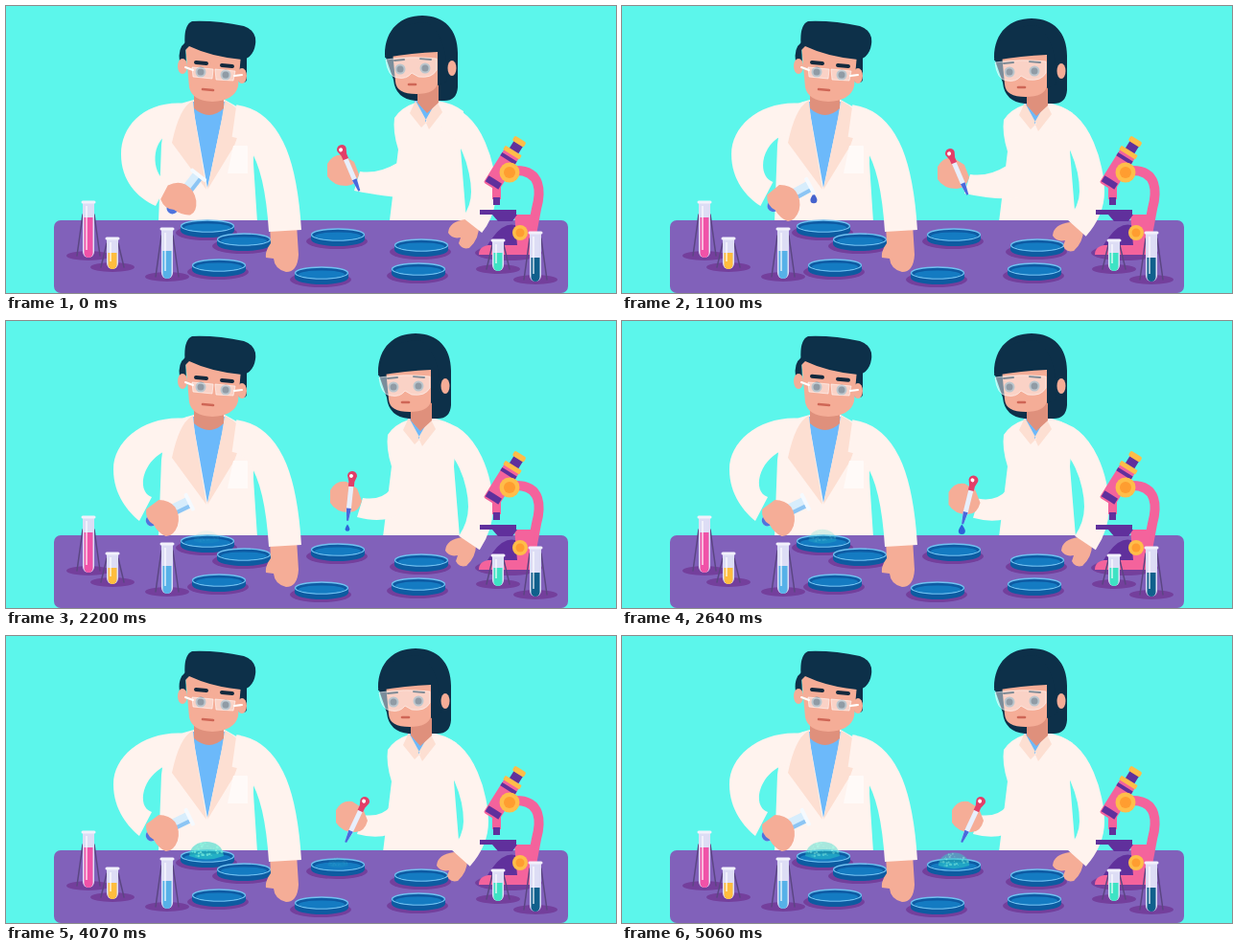
Animation, 636 px wide and 300 px high, one loop 5.17 s. Source, as an HTML page:

```html
<!DOCTYPE html>
<html lang="en">
<head>
<meta charset="utf-8">
<title>Laboratory</title>
<style>
html, body { margin: 0; width: 100%; height: 100%; overflow: hidden; background: #5cf6eb; }
svg { display: block; width: 100%; height: 100%; }
.coat { fill: #fff3ee; }
.sleeve { fill: none; stroke: #fff3ee; }
.lapel { fill: #fddfd2; }
.skin { fill: #f5ad97; }
.shade { fill: #df907c; }
.hair { fill: #0d3049; }
.shirt { fill: #6cb9fa; }
.line { fill: none; stroke-linecap: round; }
.brow { stroke: #12293d; stroke-width: 4; }
.mouth { stroke: #cf6656; stroke-width: 2.6; }
.lens { fill: #fff; fill-opacity: .45; stroke: #fff; stroke-opacity: .55; }
.pink { fill: #f4639c; }
.purple { fill: #60309c; }
.amber { fill: #ffbd49; }
.orange { fill: #ff9d30; }
.shadow { fill: #743f9c; }
</style>
</head>
<body>
<svg viewBox="0 0 636 300">
  <!-- man: body and head -->
  <path class="coat" d="M196 98Q176 102 166 116L162 145L159 226H262L258 165V115L228 98Z"/>
  <path id="manArm" class="coat"/>
  <path class="shirt" d="M194 100H229L210 190Z"/>
  <path class="lapel" d="M195 99Q181 105 173 143L209 192L197 118ZM228 99Q243 106 248 118L238 146L210 192L225 118Z"/>
  <path fill="#fffaf8" d="M237 146H252V175H231Z"/>
  <rect class="hair" x="242" y="46" width="9" height="34" rx="4"/>
  <path class="hair" d="M187 38Q179 44 181 58L188 62Z"/>
  <ellipse class="skin" cx="184" cy="63" rx="5" ry="8"/>
  <ellipse class="skin" cx="246" cy="73" rx="5" ry="8"/>
  <path class="shade" d="M196 85H227V107Q212 121 196 107Z"/>
  <path class="skin" d="M187 40H246L242 84Q238 99 215 100Q194 99 191 85Z"/>
  <path class="hair" d="M187 46Q184 20 194 16Q220 15 248 21Q262 26 260 40Q258 54 246 56Q214 53 191 42Z"/>
  <g id="manEyes"></g>
  <path class="line" stroke="#fff" stroke-width="2" d="M187 64L195 67M238 73L246 72"/>
  <path class="lens" d="M194 64L216 66L215 76L195 74ZM218 66L239 68L237 78L219 77Z"/>
  <path id="manBrows" class="line brow" d="M198 59L209 60M225 62L236 63"/>
  <path class="line mouth" d="M205 87L216 88"/>

  <!-- woman: body and head -->
  <g id="womanBody">
    <path class="coat" d="M420 103Q405 108 398 119Q396 133 402 152L393 226H473L467 152L470 112Q458 103 442 101Z"/>
    <path class="shirt" d="M418 101H443L430 124Z"/>
    <path class="lapel" d="M420 101L414 114L426 129L432 123ZM442 101L448 113L434 131L430 122Z"/>
  </g>
  <g id="womanHead">
    <path class="hair" d="M388 54C388 27 405 13 427 13C450 13 464 28 464 52V88Q463 102 450 102H420Q399 100 397 80Z"/>
    <path class="shade" d="M422 84H444V104L432 115L422 104Z"/>
    <path class="skin" d="M396 50H443V84Q440 95 421 95Q400 95 399 82Z"/>
    <path class="hair" d="M388 57Q390 20 432 20Q454 35 453 82L443 86V51Q417 52 388 57Z"/>
    <ellipse class="skin" cx="458" cy="68" rx="4.5" ry="8"/>
    <path class="line" stroke="#12293d" stroke-width="2" d="M398 60L408 59M425 58L436 59"/>
    <g id="womanEyes"></g>
    <path class="lens" d="M389 59Q415 55 442 58V70Q437 79 423 77L416 73Q411 80 401 78Q391 77 389 59Z"/>
    <path class="line mouth" d="M413 85H420"/>
  </g>

  <rect x="50" y="224" width="536" height="76" rx="7" fill="#8161ba"/>
  <g id="dishes"></g>
  <g id="glows"></g>

  <!-- man: hands -->
  <path class="skin" d="M275 228H303L305 260Q304 278 292 278Q280 275 279 264L271 263Q270 256 276 248Z"/>
  <path class="sleeve" stroke-width="34" d="M238 120C274 125 287 172 291 235"/>
  <path id="manDrop" fill="#4562cd"/>
  <g id="manTube">
    <path fill="#d7edfc" d="M26 -6H-17A6 6 0 0 0 -17 6H26Z"/>
    <path fill="#4f74dd" d="M-8 -6H-17A6 6 0 0 0 -17 6H-2Z"/>
    <path fill="#8cc5f4" d="M0 2H25V6H0Z"/>
    <rect x="25" y="-10" width="4" height="20" rx="1.5" fill="#f5faff"/>
  </g>
  <path id="manHand" class="skin" d="M-17 -8L-4 -18Q7 -18 13 -11Q19 -2 16 9Q12 20 4 20Q-4 17 -9 8Q-18 3 -17 -8Z"/>

  <!-- woman: hands -->
  <path id="womanRest" class="skin" d="M-16 -2Q-15 -14 2 -16L16 -11Q17 4 6 14Q-2 16 -5 9L-3 3Q-12 5 -16 -2Z"/>
  <path id="womanArm" class="sleeve" stroke-width="26"/>
  <path id="womanForearm" class="coat"/>
  <path id="womanDrop" fill="#2f62d8"/>
  <path id="womanHand" class="skin" d="M-15 -6Q-9 -17 2 -15L13 -8L18 5Q15 17 5 17Q-9 17 -15 7Z"/>
  <g id="pipette">
    <path fill="#e8effc" d="M-2.5 8H2.5V36L1 46H-1L-2.5 36Z"/>
    <path fill="#4969dc" d="M-2.5 34H2.5L1 47H-1Z"/>
    <path fill="#e23e68" d="M-5 0A5 5 0 0 1 5 0L3 6V11H-3V6Z"/>
    <circle cx="-1" r="2" fill="#fff"/>
  </g>

  <!-- microscope -->
  <ellipse class="shadow" cx="524" cy="258" rx="35" ry="8"/>
  <path class="line" stroke="#f4639c" stroke-width="10" d="M532 172C558 172 558 194 553 212L547 244"/>
  <path class="pink" d="M493 260Q493 251 503 250H550L558 260Z"/>
  <path class="purple" d="M502 250Q520 220 537 232V250Z"/>
  <path class="pink" d="M530 218H552L547 250H533Z"/>
  <rect class="pink" x="507" y="188" width="9" height="14"/>
  <rect class="purple" x="508" y="200" width="7" height="8"/>
  <g transform="translate(533 145) rotate(32)">
    <rect class="purple" x="-5" y="-5" width="11" height="14"/>
    <rect class="amber" x="-7" y="-7" width="14" height="6" rx="2"/>
    <rect class="pink" x="-9" y="8" width="18" height="44" rx="2"/>
    <rect class="purple" x="-9" y="15" width="18" height="4"/>
    <rect class="purple" x="-8" y="43" width="16" height="7"/>
    <rect class="amber" x="-10" y="7" width="20" height="5" rx="1"/>
  </g>
  <path class="purple" d="M494 213H532V218H494ZM507 218H533L528 225H513Z"/>
  <circle class="amber" cx="525" cy="174" r="10.5"/>
  <circle class="orange" cx="525" cy="174" r="6"/>
  <circle class="amber" cx="536" cy="237" r="8"/>
  <circle class="orange" cx="536" cy="237" r="4.5"/>
  <g id="tubes"></g>
</svg>
<script>
const LOOP = 5170, STEP = 110;
const $ = id => document.getElementById(id);

const eye = (x, y) => `<circle cx="${x}" cy="${y}" r="5.5" fill="#8496a3"/>
  <circle cx="${x}" cy="${y}" r="3.5" fill="#34495a"/>`;
$("manEyes").innerHTML = eye(203, 69) + eye(229, 72);
$("womanEyes").innerHTML = eye(404, 69) + eye(430, 68);

const dish = (x, y) => `
  <ellipse class="shadow" cx="${x - 1}" cy="${y + 6}" rx="32" ry="8"/>
  <path fill="#0d5ba1" d="M${x - 28} ${y - 1}v5a28 7 0 0 0 56 0v-5Z"/>
  <ellipse cx="${x}" cy="${y - 1}" rx="27.5" ry="6" fill="#0e5ba3" stroke="#70c1f1" stroke-width="1.3"/>
  <ellipse cx="${x}" cy="${y + .5}" rx="24" ry="4" fill="#147bc2"/>`;
$("dishes").innerHTML = dish(210, 231) + dish(248, 245) + dish(222, 272) + dish(346, 240)
  + dish(433, 251) + dish(430, 276) + dish(329, 280);

function tube(x, top, height, fill, color) {
  const bottom = top + height, foot = bottom - 2, bar = Math.max(top + 5, bottom - 45);
  const capsule = (width, y) => `<path d="M${x - width} ${y}V${bottom - width}a${width} ${width} 0 0 0 ${2 * width} 0V${y}Z"/>`;
  return `<ellipse class="shadow" cx="${x}" cy="${foot}" rx="23" ry="5"/>
  <path class="line" stroke="#5b4683" stroke-width="1.5" d="M${x - 6} ${bar}L${x - 12} ${foot}M${x + 6} ${bar}L${x + 12} ${foot}"/>
  <g fill="#ddddf5">${capsule(6, top)}</g>
  <g fill="${color}">${capsule(4.5, bottom - fill)}</g>
  <path stroke="#fff" stroke-opacity=".6" stroke-width="2" d="M${x - 2} ${top + 4}V${bottom - 8}"/>
  <path class="line" stroke="#f2f1fc" stroke-width="3" d="M${x - 6} ${top}h12"/>`;
}
$("tubes").innerHTML = tube(86, 205, 58, 42, "#f052a8") + tube(111, 243, 32, 17, "#ffbd3d")
  + tube(168, 233, 52, 29, "#57b1e8") + tube(513, 245, 32, 19, "#3ee3c4") + tube(552, 237, 51, 25, "#10608c");

// Seeded bubbles scattered inside a shallow dome
function glow(id) {
  let seed = 17, dots = "";
  const random = () => (seed = seed * 16807 % 2147483647) / 2147483647;
  for (let i = 0; i < 28; i++) {
    const angle = Math.PI * (1 + random()), radius = Math.sqrt(random());
    dots += `<circle cx="${17 * radius * Math.cos(angle)}" cy="${14 * radius * Math.sin(angle)}" r="${.5 + random()}" fill="#75f5dc"/>`;
  }
  return `<g id="${id}"><path fill="#2fd9c8" fill-opacity=".7" d="M-18 0C-17 -20 17 -20 18 0Q0 7 -18 0Z"/>${dots}</g>`;
}
$("glows").innerHTML = glow("glow1") + glow("glow2");

for (const id of ["manDrop", "womanDrop"])
  $(id).setAttribute("d", "M0 -5Q3.5 0 3.5 2A3.5 3.5 0 0 1 -3.5 2Q-3.5 0 0 -5Z");

const progress = (t, start, end) => Math.min(1, Math.max(0, (t - start) / (end - start)));
const ease = (t, start, end) => {
  const p = progress(t, start, end);
  return p * p * (3 - 2 * p);
};

function place(id, x, y, angle = 0, scale = 1) {
  $(id).setAttribute("transform", `translate(${x} ${y}) rotate(${angle}) scale(${scale})`);
}

// A drop swells for the first third of its life, then falls
function drop(id, t, start, end, x, y, distance) {
  const life = progress(t, start, end);
  $(id).style.display = life > 0 && life < 1 ? "" : "none";
  place(id, x, y + distance * progress(life, .35, 1) ** 2, 0, Math.min(1, life * 3));
}

function drawMan(t) {
  const tilt = ease(t, 0, 550), pour = ease(t, 550, 1540);
  const x = 180 - 4 * tilt - 13 * pour, y = 202 + 3 * tilt;
  const side = 120 - 3 * tilt - 5 * pour;
  const angle = -52 + 20 * tilt + 6 * pour;
  $("manArm").setAttribute("d",
    `M188 102C145 98 ${side} 125 ${side} 155C${side} 182 ${side + 16} 200 ${x - 24} 209
     L${x - 11} 184C${x - 28} 178 ${side + 31} 146 166 136L188 130Z`);
  place("manHand", x, y, angle + 27);
  place("manTube", x + 4, y - 4, angle);
  place("manBrows", 0, -3 * ease(t, 2200, 3190));
  drop("manDrop", t, 330, 1650, 204 - 7 * pour, 197, 30);
}

function drawWoman(t) {
  const lean = 1 - ease(t, 0, 550), lower = ease(t, 1540, 2200), squeeze = ease(t, 2200, 3190);
  const sway = lower * (1 - ease(t, 3190, 4070));
  place("womanBody", 7 * lean, -2 * lean);
  place("womanHead", 7 * lean, -3 * lean);

  const elbow = 490 + 8 * lean + 5 * sway;
  const restX = 465 + 12 * lean + 9 * sway, restY = 242 - 3 * lean;
  $("womanArm").setAttribute("d",
    `M${448 + 7 * lean} 117C${elbow - 13} 120 ${elbow} 170 ${elbow} 194Q${elbow} 214 ${restX + 9} ${restY - 10}`);
  place("womanRest", restX, restY);

  const x = 344 + 6 * lean + 9 * lower + 6 * squeeze;
  const y = 174 - 3 * lean + 9 * lower + 5 * squeeze;
  const cuffX = x + 18 - 6 * squeeze, cuffY = y + 12 - 3 * squeeze;
  const joint = 401 + 7 * lean;
  $("womanForearm").setAttribute("d",
    `M${cuffX + 1} ${cuffY - 10}Q${cuffX + 20} ${cuffY - 7} ${joint} ${cuffY - 19}
     L${joint + 12} 200Q${joint - 6} ${cuffY + 18} ${cuffX - 5} ${cuffY + 10}Z`);
  place("womanHand", x, y);
  place("pipette", 342 + 8 * lean + 19 * lower + 13 * squeeze, 154 - 4 * lean + 8 * lower + 11 * squeeze,
    -23 + 29 * lower + 19 * squeeze);
  drop("womanDrop", t, 1870, 3300, 356 - 4 * squeeze, 216, 18);
}

function drawGlows(t) {
  const first = ease(t, 1650, 4070), second = ease(t, 3630, 5060);
  $("glow1").style.opacity = .8 * first - .2 * ease(t, 4070, 5060);
  $("glow2").style.opacity = .65 * second;
  place("glow1", 209, 230, 0, .7 + .3 * first);
  place("glow2", 346, 240, 0, .5 + .4 * second);
}

function render(now) {
  const t = Math.floor(now % LOOP / STEP) * STEP;
  drawMan(t);
  drawWoman(t);
  drawGlows(t);
  requestAnimationFrame(render);
}
render(0);
</script>
</body>
</html>
```
